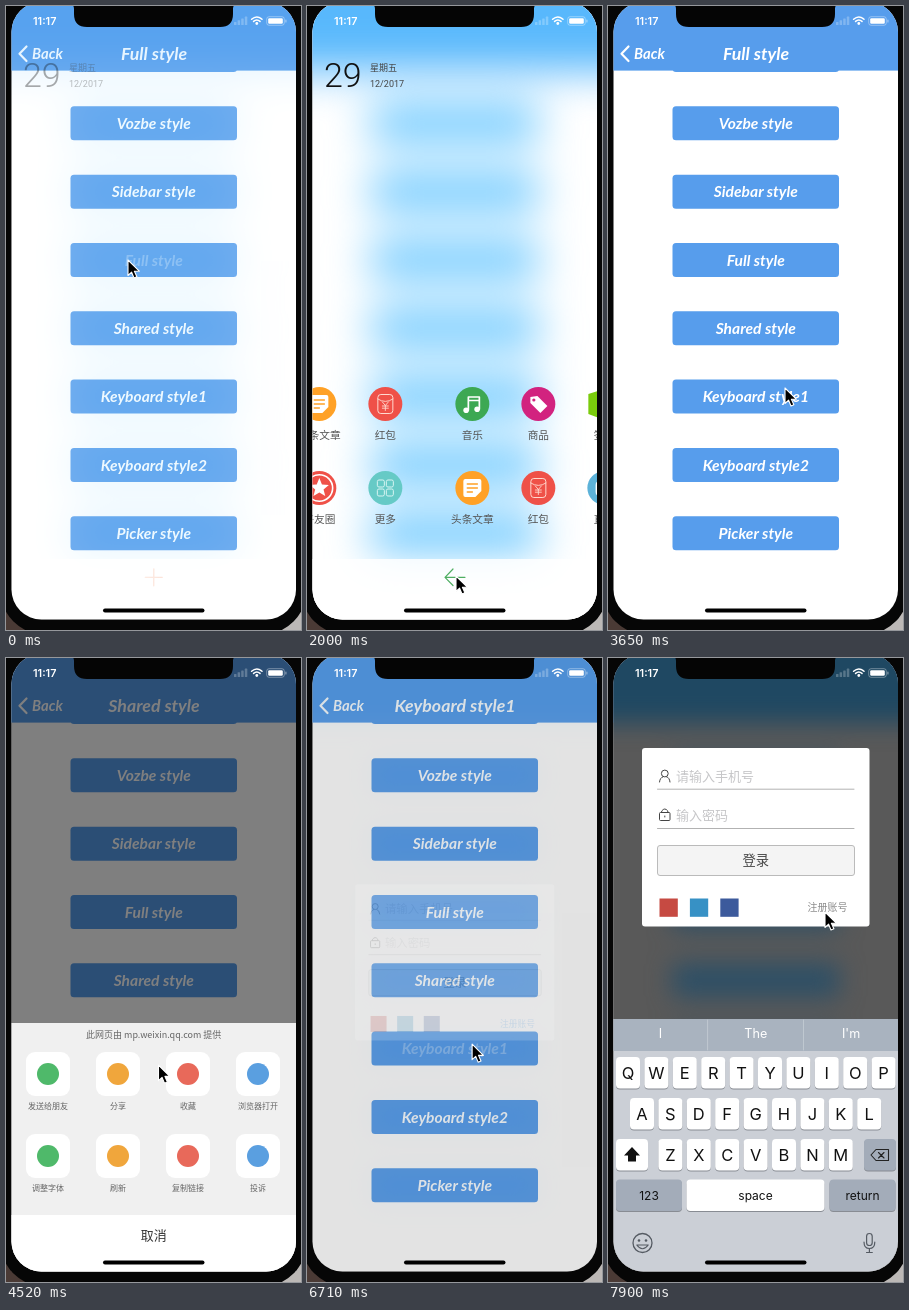
Animation, 295 px wide and 624 px high, one loop 8 s. Source, as an HTML page:

```html
<!DOCTYPE html>
<html lang="zh">
<head>
<meta charset="utf-8">
<title>Popup styles</title>
<style>
html, body { margin: 0; width: 100%; height: 100%; overflow: hidden; background: #000; }
svg { display: block; width: 295px; height: 624px; }
.g { font-family: Lato, 'Open Sans', sans-serif; font-style: italic; font-weight: 700; }
.c { font-family: 'Noto Sans CJK SC', 'Noto Sans CJK', sans-serif; }
.i { font-family: Inter, Roboto, sans-serif; }
.r { font-family: Roboto, sans-serif; }
.m { text-anchor: middle; }
</style>
</head>
<body>
<svg id="stage" viewBox="0 0 295 624" xmlns="http://www.w3.org/2000/svg"></svg>
<script>
const LOOP = 8000, BLUE = '#579dec';
const rect = (x, y, w, h, fill, r = 0, more = '') =>
  `<rect x="${x}" y="${y}" width="${w}" height="${h}" rx="${r}" fill="${fill}" ${more}/>`;
const text = (x, y, size, str, fill, cls, more = '') =>
  `<text x="${x}" y="${y}" font-size="${size}" fill="${fill}" class="${cls}" ${more}>${str}</text>`;
const line = (d, stroke, w = 1.2, more = '') =>
  `<path d="${d}" fill="none" stroke="${stroke}" stroke-width="${w}" stroke-linecap="round" stroke-linejoin="round" ${more}/>`;
const fill = (d, color) => `<path d="${d}" fill="${color}"/>`;
const disc = (x, y, r, color, more = '') => `<circle cx="${x}" cy="${y}" r="${r}" fill="${color}" ${more}/>`;
const group = (id, body, more = '') => `<g id="${id}" ${more}>${body}</g>`;

// List page
const styles = ['Vozbe style', 'Sidebar style', 'Full style', 'Shared style',
  'Keyboard style1', 'Keyboard style2', 'Picker style'];
const rowY = i => 100.3 + i * 68.33;
const list = rect(0, -10, 295, 640, '#fff') + rect(64.5, 32, 166.5, 34, BLUE, 3.5) +
  styles.map((s, i) => rect(64.5, rowY(i), 166.5, 34, BLUE, 3.5) +
    text(147.8, rowY(i) + 22.6, 15.6, s, '#fff', 'g m', `id="btn${i}"`)).join('') +
  rect(0, -10, 295, 74.6, BLUE) + line('M20.5 40.5L13.5 47.8L20.5 55', '#fff', 2.2) +
  text(26, 52.5, 14.8, 'Back', '#fff', 'g') + text(148, 54.2, 17.8, '', '#fff', 'g m', 'id="title"');

// Blurred copy of the list
const blurred = (filter, bg, bar, button) => rect(0, -10, 295, 640, bg) +
  `<g filter="url(#${filter})">` + rect(-60, -90, 415, 155, bar) +
  styles.map((s, i) => rect(64.5, rowY(i), 166.5, 34, button, 4)).join('') + '</g>';

// Grid menu
const W = '#fff';
const star = Array.from({ length: 10 }, (_, k) => {
  const a = k * Math.PI / 5, r = k % 2 ? 4.4 : 10;
  return (r * Math.sin(a)).toFixed(1) + ' ' + (-r * Math.cos(a)).toFixed(1);
}).join('L');
const dot = color => disc(0, 0, 17, color);
const article = dot('#ffa126') + fill('M-7-9H7Q9-9 9-7V3L3 9H-7Q-9 9-9 7V-7Q-9-9-7-9Z', W) +
  line('M-5-4H5M-5 0H5M-5 4H0', '#ffa126', 1.6);
const packet = dot('#ef5148') + rect(-7.5, -9.5, 15, 19, 'none', 3, 'stroke="#ffd9cf" stroke-width="1"') +
  line('M-7.5-5Q0 0 7.5-5M-3-2L0 1.5L3-2M0 1.5V6.5M-3 2H3M-3 4.2H3', '#ffd9cf', 0.9);
const live = dot('#5cb2d9') + rect(-8, -6, 16, 13, 'none', 3, 'stroke="#fff" stroke-width="1.5"') +
  line('M-4-9L-2-6M4-9L2-6', W, 1.4) + line('M-2-2.5L3 .5L-2 3.5Z', W, 1.2);
const review = dot('#5cb2d9') + `<ellipse rx="9.5" ry="8" cy="-1" fill="#fff"/>` + fill('M-5 4L-5 10L1 6Z', W) +
  [-4.5, 0, 4.5].map(x => disc(x, -1, 1.6, '#5cb2d9')).join('');
const items = [
  ['文字', dot('#e0497f') + line('M3-8H-8V9H9V-1', W) + line('M-4 5L-3 1L7-9L10-6L0 4Z', W, 1)],
  ['照片视频', dot('#ef5148') + fill('M-5-6.5L7 0L-5 6.5Z', W)],
  ['头条文章', article], ['红包', packet], ['直播', live], ['点评', review],
  ['好友圈', dot('#ef5148') + disc(0, 0, 13.3, 'none', 'stroke="#fff" stroke-width="1.6"') + fill('M' + star + 'Z', W)],
  ['更多', dot('#66cac6') + [[-8, -8], [1, -8], [-8, 1], [1, 1]].map(p =>
    rect(p[0], p[1], 7, 7, 'none', 1.6, 'stroke="#d9f5f3" stroke-width="1"')).join('')],
  ['音乐', dot('#3da853') + line('M-4 6V-7H7V5M-4-3.5H7', W, 1.7) + disc(-6.2, 6.2, 2.8, W) + disc(4.8, 5.2, 2.8, W)],
  ['商品', dot('#d2237f') + fill('M-8-7L-1-8L9 2L2 9L-8-1Z', W) + disc(-4.5, -4, 1.6, '#d2237f')],
  ['签到', fill('M-16-10L0-15L16-10V10L0 16L-16 10Z', '#7acb0c') + line('M-6 0L-1 5L7-5', W, 2)],
  ['短片', dot('#ffc414') + fill('M-5-7L8 0L-5 7Z', W)],
  ['头条文章', article], ['红包', packet], ['直播', live], ['点评', review]
];
const grid = items.map(([label, icon], i) => {
  const x = 48.7 + (i % 4) * 66 + (i >> 3) * 285, y = 398 + ((i >> 2) % 2) * 84;
  return group('item' + i, `<g transform="translate(${x} ${y})">${icon}</g>` +
    text(x, y + 35, 10.7, label, '#555', 'c m'));
}).join('');
const full = group('veil', blurred('soft', '#fff', '#58b8fc', '#58c1ff') + rect(0, 553, 295, 70, '#fff', 0, 'opacity=".85"')) +
  group('date', text(17, 81, 34, '29', '#111', 'r', 'font-weight="300"') +
    text(63, 64.5, 9, '星期五', '#444', 'c') + text(63, 80.5, 9, '12/2017', '#444', 'r')) +
  `<g clip-path="url(#pane)">${group('grid', grid)}</g>` +
  group('cross', line('M-8.5 0H8.5M0-8.5V8.5', '#f2875a', 1.2)) +
  group('arrow', line('M138 571.3H158M146 563L138 571.3L146 579.5', '#4fae62', 1.2));

// Share sheet
const shares = ['发送给朋友', '分享', '收藏', '浏览器打开', '调整字体', '刷新', '复制链接', '投诉'];
const shareInk = ['#4fb96a', '#f0a63c', '#e8695a', '#5a9fe0'];
const sheet = rect(0, 365, 295, 250, '#f0f0f0') + text(147.7, 380.3, 9, '此网页由 mp.weixin.qq.com 提供', '#666', 'c m') +
  shares.map((s, i) => {
    const x = 42 + (i % 4) * 70, y = 394 + (i >> 2) * 82;
    return rect(x - 22, y, 44, 44, '#fff', 9) + disc(x, y + 22, 11, shareInk[i % 4]) + text(x, y + 57, 8, s, '#666', 'c m');
  }).join('') + rect(0, 557, 295, 60, '#fff') + text(147.7, 582, 13, '取消', '#333', 'c m');

// Login dialog
const dialog = rect(34, 90, 227.5, 178.5, '#fff', 3) +
  disc(56.8, 115.5, 3.4, 'none', 'stroke="#444"') + line('M51.5 124Q52 119.5 55 118.8M62 124Q61.5 119.5 58.6 118.8', '#444', 1) +
  rect(51.5, 154.5, 10.5, 8, 'none', 1, 'stroke="#444"') + line('M53.7 154V153Q56.8 149 59.8 153V154M56.8 158V159', '#444', 1) +
  text(68, 122.7, 13, '请输入手机号', '#c6c6c8', 'c') + text(68, 162, 13, '输入密码', '#c6c6c8', 'c') +
  line('M49.5 131.2H246', '#aaa', 0.9, 'id="rule"') + line('M49.5 170.5H246', '#aaa', 0.9) +
  rect(64.2, 110, 1.6, 16, '#3f6fe6', 0.8, 'id="caret"') +
  rect(49.5, 187.5, 197, 30, '#f4f4f4', 2.5, 'stroke="#b4b4b4" stroke-width=".9"') + text(147.8, 207.3, 13.3, '登录', '#444', 'c m') +
  ['#c64a42', '#3791c5', '#3c5a9c'].map((c, i) => rect(51.5 + i * 30.4, 240.5, 18.3, 18.3, c)).join('') +
  text(199.5, 253.3, 10, '注册账号', '#4f9de8', 'c', 'id="link"');

// Keyboard
const key = (x, y, w, color, h = 31.5) => rect(x, y + 1, w, h, '#888c93', 4) + rect(x, y, w, h, color, 4);
const keyRow = (letters, x, y) => [...letters].map((ch, i) =>
  key(x + i * 28.4 - 12, y, 24, '#fff') + text(x + i * 28.4, y + 21.8, 16.5, ch, '#111', 'i m')).join('');
const GREY = '#a3acb9';
const keys = rect(0, 361, 295, 260, '#cbcfd6') + rect(0, 361, 295, 32, '#a9b3bf') +
  line('M99.6 362V392M195.5 362V392', '#c6cdd5', 0.8) +
  group('hints', ['I', 'The', "I'm"].map((s, i) => text(52.5 + i * 95.3, 380.3, 12.6, s, '#fff', 'i m')).join('')) +
  keyRow('QWERTYUIOP', 20, 399) + keyRow('ASDFGHJKL', 34, 440) + keyRow('ZXCVBNM', 62.4, 481) +
  key(8, 481, 32, '#fff') + fill('M24 489L32 497.5H28V503.5H20V497.5H16Z', '#111') +
  key(256, 481, 32, GREY) + line('M263 497L268 491.5H280.5V502.5H268ZM270.5 494.5L276 500M276 494.5L270.5 500', '#222', 1.1) +
  key(8, 521.5, 66, GREY) + key(78.5, 521.5, 138, '#fff') + key(221.5, 521.5, 66, GREY) +
  [['123', 41], ['space', 147.5], ['return', 254.5]].map(([s, x]) => text(x, 542, 12, s, '#111', 'i m')).join('') +
  disc(34.5, 585, 9.5, 'none', 'stroke="#555b63" stroke-width="1.3"') +
  disc(31, 582.5, 1.3, '#555b63') + disc(38, 582.5, 1.3, '#555b63') + line('M28.8 587Q34.5 594.5 40.2 587Z', '#555b63', 1.2) +
  rect(258.6, 575.5, 5.6, 12, 'none', 2.8, 'stroke="#555b63" stroke-width="1.2"') +
  line('M256 584Q256 590.5 261.4 590.5Q266.8 590.5 266.8 584M261.4 590.5V594.5M258.5 594.5H264.3', '#555b63', 1.2);

// Phone frame
const status = text(27, 18.8, 10.8, '11:17', '#fff', 'i', 'font-weight="600"') +
  [0, 1, 2, 3].map(i => rect(228 + i * 3.6, 16 - i * 1.8, 2.5, 3 + i * 1.8, '#fff', 0.6, 'opacity=".25"')).join('') +
  line('M245.6 13.3Q250.8 8.6 256 13.3M247.6 15.4Q250.8 12.6 254 15.4', '#fff', 1.5) + disc(250.8, 17.5, 1.4, '#fff') +
  rect(260.7, 10.7, 17.6, 8.6, 'none', 2.4, 'stroke="#fff" stroke-width=".8" stroke-opacity=".45"') +
  rect(262.2, 12.2, 14.6, 5.6, '#fff', 1.2) + rect(279.3, 13.4, 1.2, 3.2, '#fff', 0.6, 'opacity=".45"');
const notch = fill('M60-5Q68-3 68 3V8Q68 21 81 21H214Q227 21 227 8V3Q227-3 235-5Z', '#050505');
const blur = (id, s) => `<filter id="${id}" filterUnits="userSpaceOnUse" x="-120" y="-150" width="540" height="860" color-interpolation-filters="sRGB"><feGaussianBlur stdDeviation="${s}"/></filter>`;

document.getElementById('stage').innerHTML =
  '<defs>' + blur('soft', 22) + blur('dim', 12) +
  `<clipPath id="screen">${rect(5.5, -4, 284.5, 617.6, W, 30)}</clipPath><clipPath id="pane">${rect(0, 365, 295, 188, W)}</clipPath></defs>` +
  rect(0, 0, 148, 624, '#4a3a35') + rect(148, 0, 147, 624, '#bcb8b6') + rect(-6, -30, 307, 659, '#060606', 46) +
  '<g clip-path="url(#screen)">' + list + group('full', full) +
  rect(0, -10, 295, 640, '#000', 0, 'id="shade"') + group('sheet', sheet) +
  group('dark', blurred('dim', '#595959', '#1f4862', '#2d4f66')) + group('dialog', dialog) + group('keys', keys) +
  status + notch + rect(97, 602.5, 101.5, 4, '#000', 2) + '</g>' +
  group('mouse', `<path d="M0 0V15.5L3.6 12.2L6 18L8.9 16.8L6.4 11.2H11.3Z" fill="#000" stroke="#fff" stroke-width="1.1" stroke-linejoin="round"/>`);

// Motion
const el = {};
document.querySelectorAll('#stage [id]').forEach(n => el[n.id] = n);
const set = (id, name, value) => el[id].setAttribute(name, value);
const move = (id, x, y, rest = '') => set(id, 'transform', `translate(${x} ${y})${rest}`);
const show = (id, on) => set(id, 'visibility', on ? 'visible' : 'hidden');
const ramp = (t, start, length) => Math.min(1, Math.max(0, (t - start) / length));
const easeOut = u => 1 - (1 - u) ** 2;
const easeInOut = u => u < 0.5 ? 2 * u * u : 1 - 2 * (1 - u) ** 2;
const bounce = s => s <= 0 ? 0 : 1 - Math.exp(-11 * s) * (Math.cos(9 * s) + 1.2 * Math.sin(9 * s));
const settle = s => s <= 0 ? 0 : 1 - (1 + 15 * s) * Math.exp(-15 * s);

const path = [[0, 122, 254], [200, 122, 254], [760, 203, 455], [900, 203, 455], [990, 208, 455], [1250, 95, 452],
  [1400, 100, 470], [1740, 149, 570], [3400, 149, 570], [3650, 177, 382], [3880, 150, 320], [4260, 150, 320],
  [4880, 157, 566], [6000, 157, 566], [6480, 165, 386], [6700, 165, 386], [7030, 217, 455], [7540, 217, 455], [7820, 217, 254]];
function pointer(t) {
  const k = path.findIndex(p => p[0] > t);
  if (k < 0) return path[path.length - 1].slice(1);
  const [a, b] = [path[k - 1], path[k]];
  const u = easeInOut((t - a[0]) / (b[0] - a[0]));
  return [a[1] + (b[1] - a[1]) * u, a[2] + (b[2] - a[2]) * u];
}

function draw(t) {
  move('mouse', ...pointer(t));
  el.title.textContent = t < 3950 ? styles[2] : t < 6650 ? styles[3] : styles[4];
  const pressed = t < 250 ? 2 : t > 3900 && t < 4150 ? 3 : t > 6490 && t < 6800 ? 4 : -1;
  styles.forEach((s, i) => set('btn' + i, 'opacity', i === pressed ? 0.3 : 1));

  // Full-screen menu
  const veil = ramp(t, -60, 330) * (1 - ramp(t, 2680, 330));
  show('full', veil > 0);
  set('veil', 'opacity', veil);
  set('date', 'opacity', Math.min(1, veil * 1.9));
  const page = easeOut(ramp(t, 1040, 480)) - easeOut(ramp(t, 1920, 350));
  move('grid', -285 * page, 0);
  items.forEach((_, i) => {
    const n = i % 8;
    const up = bounce((t - 90 - n * 25) / 1000) - ramp(t, 2560 + (7 - n) * 20, 250) ** 2;
    move('item' + i, 0, 200 * (1 - up));
  });
  const turn = 45 * (easeOut(ramp(t, 0, 400)) - easeOut(ramp(t, 2560, 350)));
  move('cross', 147.8, 571.3, ` rotate(${turn})`);
  set('cross', 'opacity', page < 0.5 ? Math.min(1, veil * 1.2) : 0);
  set('arrow', 'opacity', page < 0.5 ? 0 : 1);

  // Share sheet
  const open = easeOut(ramp(t, 4060, 380)) - easeInOut(ramp(t, 5430, 375));
  set('shade', 'opacity', 0.5 * open);
  show('sheet', open > 0);
  move('sheet', 0, 250 * (1 - open));

  // Login with keyboard
  const fade = easeOut(ramp(t, 6690, 240)), rise = settle((t - 6950) / 1000);
  set('dark', 'opacity', fade);
  set('dialog', 'opacity', fade);
  const k = 0.85 + 0.15 * fade;
  move('dialog', 148 * (1 - k), 125 * (1 - rise) + 180 * (1 - k), ` scale(${k})`);
  show('keys', rise > 0);
  move('keys', 0, 253 * (1 - rise));
  set('hints', 'opacity', ramp(t, 6900, 350));
  show('caret', t > 6900 && t < 7600);
  set('rule', 'stroke', t < 7550 ? '#dcdcdc' : '#aaa');
  set('link', 'fill', t < 7830 ? '#4f9de8' : '#8a8a8a');
}

const begin = performance.now();
function tick() {
  draw((performance.now() - begin) % LOOP);
  requestAnimationFrame(tick);
}
tick();
</script>
</body>
</html>
```
